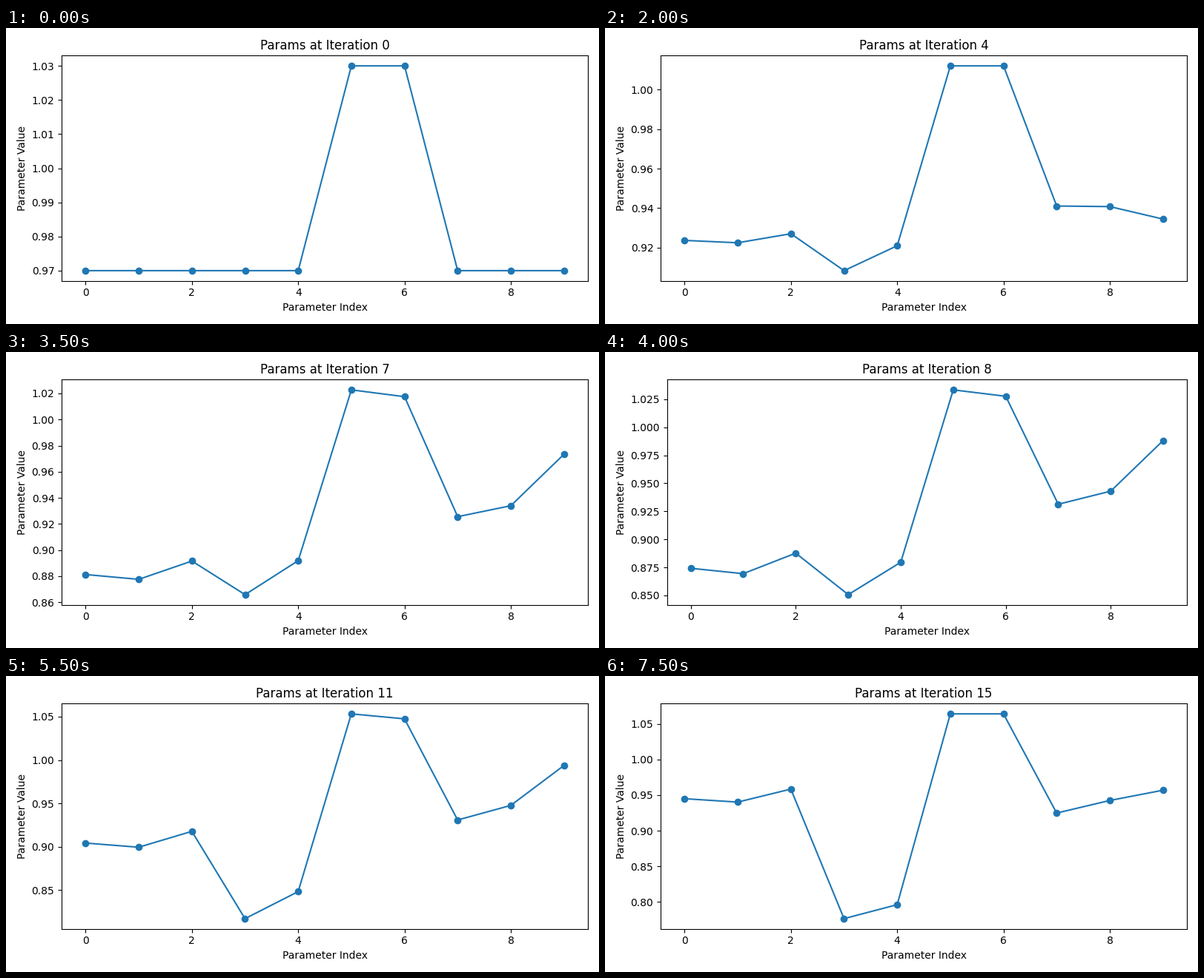
Write a matplotlib script that moves like this. It is 800x400 px and loops after 8000 ms.

```python
import numpy as np
import matplotlib.pyplot as plt
from matplotlib.animation import FuncAnimation

FRAMES, INTERVAL = 16, 500

# Key points of the curves that lead each group of parameters.
TIMES = np.array([0, 2, 4, 6, 8, 11, 15])
LEFT = [.97, .9245, .9237, .8936, .8742, .9043, .945]
DIP = [.97, .9287, .9084, .8814, .8507, .8172, .7763]
PEAK = [1.03, .9925, 1.012, 1.0137, 1.0333, 1.0532, 1.0643]
RIGHT = [.97, .9252, .9411, .9224, .9313, .9309, .9248]
RISE = [.97, .9315, .9408, .9273, .943, .9477, .9425]
END = [.97, .9376, .9345, .9569, .9882, .9937, .9569]


def follow(keys, t):
    """Smooth curve through the key points, evaluated at t."""
    keys = np.array(keys)
    slope = np.gradient(keys, TIMES, edge_order=2)
    k = min(np.searchsorted(TIMES, t, side="right"), len(TIMES) - 1) - 1
    h = TIMES[k + 1] - TIMES[k]
    u = (t - TIMES[k]) / h
    ease = u * u * (3 - 2 * u)
    return ((1 - ease) * keys[k] + ease * keys[k + 1]
            + h * u * (1 - u) * ((1 - u) * slope[k] - u * slope[k + 1]))


def hump(t, start, stop, power=1):
    """Half sine wave between start and stop, zero outside."""
    u = np.clip((t - start) / (stop - start), 0, 1)
    return max(np.sin(np.pi * u), 0) ** power


def params(t):
    left, dip, peak, right, rise, end = (
        follow(keys, t) for keys in (LEFT, DIP, PEAK, RIGHT, RISE, END))
    spread = min(t / 8, 1) ** 2
    return [left, left - .0048 * spread, left + .0135 * spread,
            dip, dip + .0315 * hump(t, 1.8, 18.6),
            peak, peak - .006 * hump(t, 4, 15, .5),
            right, rise, end]


fig, ax = plt.subplots(figsize=(8, 4), dpi=100)


def draw(it):
    ax.clear()
    ax.plot(params(it), marker="o")
    ax.set_title(f"Params at Iteration {it}")
    ax.set_xlabel("Parameter Index")
    ax.set_ylabel("Parameter Value")
    fig.tight_layout()
    return ax.lines


anim = FuncAnimation(fig, draw, frames=FRAMES, interval=INTERVAL,
                     repeat=True, repeat_delay=0)
plt.show()
```
